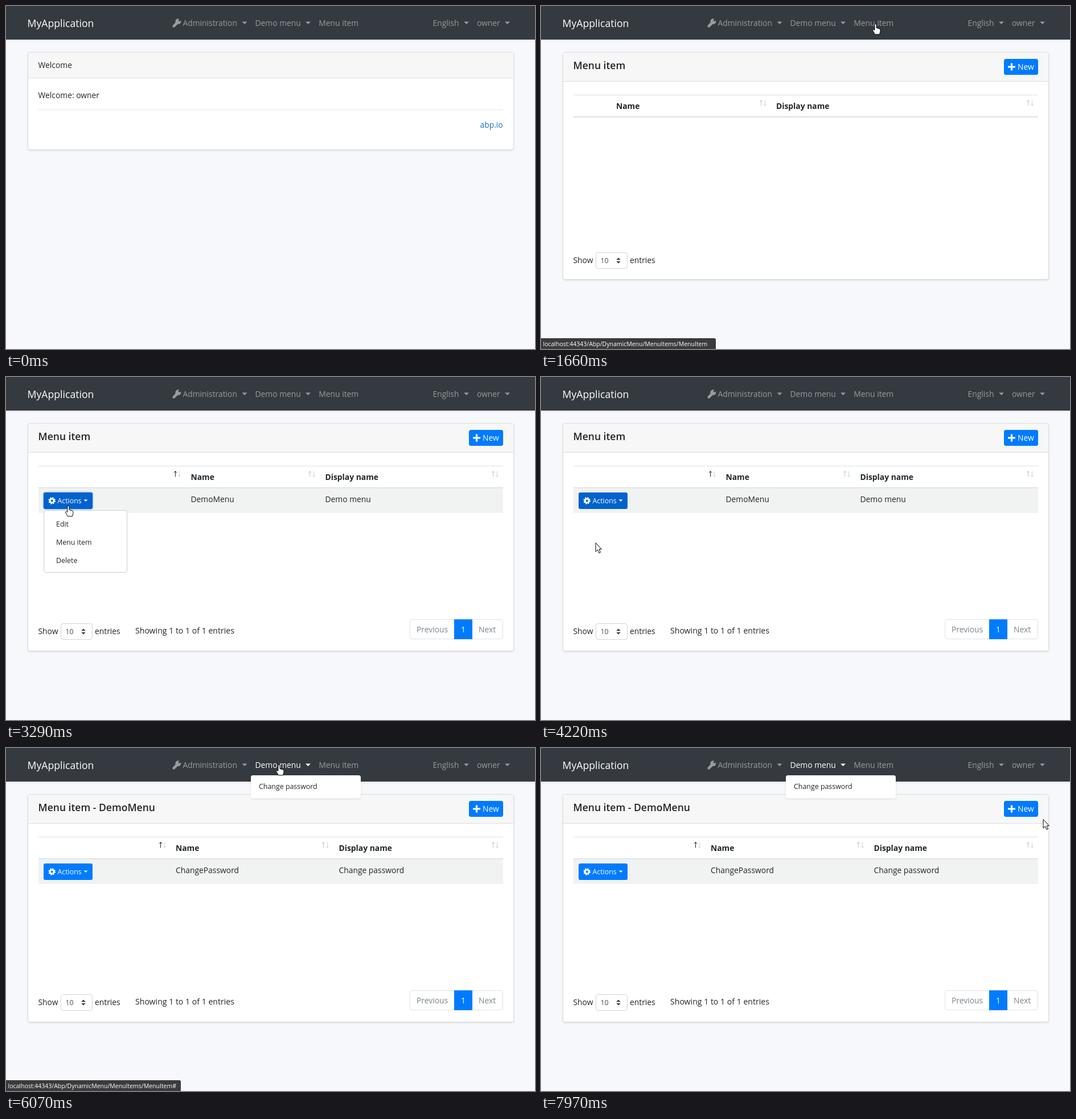
Animation, 929 px wide and 603 px high, one loop 8000 ms. Source, as an HTML page:

```html
<!DOCTYPE html>
<html lang="en">
<head>
<meta charset="utf-8">
<title>Menu items</title>
<style>
html, body { margin: 0; width: 100%; height: 100%; overflow: hidden; background: #f7f8fb; }
svg { display: block; font-family: "Open Sans", "Noto Sans", sans-serif; font-size: 13.85px; }
text { white-space: pre; }
.brand { font-size: 17.65px; }
.title { font-size: 17.55px; font-weight: 600; }
.bold { font-weight: 700; }
.wide { font-size: 14.1px; }
.small { font-size: 12.4px; }
.tiny { font-size: 10.5px; }
</style>
</head>
<body>
<svg width="929" height="603" viewBox="0 0 929 603">
  <defs>
    <filter id="soft" x="-5%" y="-10%" width="110%" height="125%" color-interpolation-filters="sRGB">
      <feDropShadow dx="0" dy="1.5" stdDeviation="1.8" flood-opacity=".1"/>
    </filter>
  </defs>
  <g id="page"></g>
  <g id="status"></g>
  <path id="cursor" stroke="#000" stroke-linejoin="round"/>
</svg>
<script>
const LOOP = 8000, STEP = 64;
const USER = 'owner';
const BLUE = '#007bff', INK = '#212529', LINK = '#999c9f', LIT = '#ccced0';
const LINE = '#dee2e6', DARK = '#343a40', GRAY = '#7b838a';
const LEFT = 57, RIGHT = 873, WIDTH = RIGHT - LEFT;

// Moments at which the page reacts
const AT = {
  hover: 780, list: 1510, rows: 1880, press: 3100, drop: 3160, pick: 4130,
  sub: 4400, subRows: 4680, demoHover: 5540, demoOpen: 5860
};
const during = (t, a, b = LOOP) => t >= a && t < b;

// Drawing helpers
const $ = id => document.getElementById(id);
const text = (x, y, s, fill = INK, cls = '') =>
  `<text x="${x}" y="${y}" fill="${fill}" class="${cls}">${s}</text>`;
const rect = (x, y, w, h, fill, extra = '') =>
  `<rect x="${x}" y="${y}" width="${w}" height="${h}" fill="${fill}" ${extra}/>`;
const box = (x, y, w, h, fill, stroke, extra = '') =>
  rect(x + .5, y + .5, w - 1, h - 1, fill, `rx="3.5" stroke="${stroke}" ${extra}`);
const path = (d, fill, extra = '') => `<path d="${d}" fill="${fill}" ${extra}/>`;
const stroke = (d, color, width = 1) => path(d, 'none', `stroke="${color}" stroke-width="${width}"`);
const dot = (x, y, r, fill, extra = '') => `<circle cx="${x}" cy="${y}" r="${r}" fill="${fill}" ${extra}/>`;
const rule = (y, color = LINE, h = 1) => rect(LEFT, y, WIDTH, h, color);
const caret = (x, y, fill, r = 4.4) => path(`M${x - r} ${y}h${2 * r}l${-r} ${r}z`, fill);

// Pointer: start, end and place reached; it leaves from the place before
const ENTRY = [861, 507];
const MOVES = [
  [140, 840, 579, 24], [1310, 1310, 588, 19],
  [1450, 1660, 587, 31], [1720, 2250, 519, 289],
  [2310, 2450, 199, 273], [2510, 2870, 112, 214],
  [3100, 3810, 95, 291], [4360, 5160, 316, 214],
  [5210, 6010, 479, 28], [6070, 6850, 479, 71],
  [6910, 6990, 525, 72], [7130, 7400, 390, 262], [7460, 7970, 881, 125]
];

function pointer(t) {
  const i = MOVES.filter(m => t >= m[0]).length - 1;
  if (i < 0) return null;
  const [start, end, ...to] = MOVES[i];
  const from = i ? MOVES[i - 1].slice(2) : ENTRY;
  const n = Math.round((end - start) / STEP);
  const u = t >= end ? 1 : (Math.floor((t - start) / (end - start) * n) + 1) / (n + 1);
  const ease = u * u * (3 - 2 * u);
  return to.map((v, k) => Math.round(from[k] + (v - from[k]) * ease));
}

const SHAPES = {
  arrow: 'M.5 0V15.6L4 12.3L6.4 17.9L8.9 16.8L6.5 11.3H10.8Z',
  hand: 'M-1.6 11V1Q0-1 1.6 1V7L7 8.4Q8.6 9 8.5 13L7 18.4H-1L-5 11.6Q-5-9.6-1.6 11Z'.replace('-5-9.6', '-4.6 8.6'),
  ibeam: 'M-3-7.5H3M0-7.5V7.5M-3 7.5H3'
};

const inside = (p, x, y, w, h) => !!p && p[0] >= x && p[0] < x + w && p[1] >= y && p[1] < y + h;

function stateAt(t) {
  const p = pointer(t);
  const s = {
    view: t < AT.list ? 'home' : t < AT.sub ? 'root' : 'sub',
    ready: during(t, AT.rows, AT.sub) || t >= AT.subRows,
    itemHover: during(t, AT.hover, AT.list),
    actions: during(t, AT.drop, AT.pick),
    ring: during(t, AT.press, AT.pick),
    demo: t >= AT.demoOpen ? 2 : t >= AT.demoHover ? 1 : 0
  };
  const onButton = s.ready && inside(p, 66, 203, 86, 29);
  s.button = during(t, AT.press, AT.sub) ? '#0062cc' : onButton ? '#0069d9' : BLUE;
  s.row = s.actions && p[1] >= 242 ? Math.floor((p[1] - 242) / 32) : -1;
  s.sub = s.demo === 2 && inside(p, 430, 48, 193, 42);
  const onNav = inside(p, 430, 14, 192, 34);
  const kind = onNav || onButton || s.row >= 0 || s.sub ? 'hand'
    : s.view === 'sub' && s.ready && inside(p, 298, 206, 110, 18) ? 'ibeam' : 'arrow';
  return { s, p, kind };
}

function wrench() {
  return path('M294.7 35.3L301 29', 'none', `stroke="${LINK}" stroke-width="4.6" stroke-linecap="round"`) +
    dot(302.3, 27.2, 4.9, LINK) + stroke('M303.5 26L309 20.5', DARK, 3.6);
}

function nav(s) {
  const link = (x, label, arrow, color = LINK) =>
    text(x, 35, label, color) + (arrow ? caret(arrow, 27.5, color) : '');
  return rect(0, 0, 929, 59, DARK, 'filter="url(#soft)"') + wrench() +
    text(37.5, 37, 'MyApplication', '#fff', 'brand') +
    link(310.5, 'Administration', 419) +
    link(437.5, 'Demo menu', 530.5, [LINK, LIT, '#fff'][s.demo]) +
    link(549.3, 'Menu item', 0, s.itemHover ? LIT : LINK) +
    link(749.5, 'English', 808.5) + link(827, USER, 880.5);
}

function card(bottom, headEnd) {
  return box(38, 81, 854, bottom - 81, '#fff', '#dcdcde', 'filter="url(#soft)"') +
    rect(39, 82, 852, headEnd - 82, '#f7f7f7', 'rx="3"') + rect(38, headEnd, 854, 1, '#dcdcdd');
}

function home() {
  return card(253, 126) + text(56.5, 109, 'Welcome') +
    text(56.5, 162, `Welcome: ${USER}`) + rule(182, '#e5e5e5') +
    text(832.5, 214, 'abp.io', '#0f74bd');
}

function sorter(x, active) {
  const arrow = (px, y, dir, color) => stroke(`M${px} 165.5v10M${px - 2.5} ${y + 3 * dir}l2.5 ${-3 * dir}l2.5 ${3 * dir}`, color);
  return arrow(x, 165.5, 1, active ? INK : '#c3c7ca') + arrow(x + 7, 175.5, -1, '#bfdce2');
}

function actionButton(s) {
  const [x, y] = [80.7, 217.5];
  return (s.ring ? rect(64.5, 201.5, 89, 32, '#a9cffb', 'rx="5"') : '') +
    rect(66, 203, 86, 29, s.button, 'rx="3"') +
    dot(x, y, 3.4, 'none', 'stroke="#fff" stroke-width="2.8"') +
    dot(x, y, 5.2, 'none', 'stroke="#fff" stroke-width="2.2" stroke-dasharray="2.2 1.884"') +
    text(90.5, 222, 'Actions', '#fff', 'small') + caret(140, 215.6, '#fff', 3.5);
}

function actionMenu(s) {
  const rows = ['Edit', 'Menu item', 'Delete'].map((label, i) => {
    const y = 242 + 32 * i;
    return (i === s.row ? rect(67, y, 145, 32, '#e9ecef') : '') + text(88, y + 20.5, label, INK, 'small');
  });
  return box(66, 234, 147, 110, '#fff', '#cfcfcf') + rows.join('');
}

function pager() {
  return text(227, 450.5, 'Showing 1 to 1 of 1 entries', INK, 'wide') +
    box(709, 426, 164, 35, '#fff', LINE) + rect(787, 426, 32, 35, BLUE) +
    text(721, 449, 'Previous', GRAY) + text(799, 449, '1', '#fff') + text(830, 449, 'Next', GRAY);
}

function newButton() {
  return rect(813, 93, 60, 28, BLUE, 'rx="3.5"') +
    stroke('M820 107h13M826.5 100.5v13', '#fff', 3.2) + text(837, 112, 'New', '#fff');
}

function pageSize() {
  return text(56.5, 451.5, 'Show') + text(156, 451.5, 'entries') +
    box(96, 433, 56, 29, '#fff', '#ced4da') + text(104.5, 452, '10', '#495057', 'small') +
    caret(136, 448.7, DARK, 3.8) + `<g transform="matrix(1 0 0 -1 0 895)">${caret(136, 448.7, DARK, 3.8)}</g>`;
}

function list(s) {
  const sub = s.view === 'sub';
  const columns = !s.ready ? [132, 413] : sub ? [298, 584.5] : [324.5, 560.5];
  const row = sub ? ['ChangePassword', 'Change password'] : ['DemoMenu', 'Demo menu'];
  const cells = (y, labels, cls) => labels.map((s, i) => text(columns[i], y, s, INK, cls)).join('');
  // Each sort mark sits just before the next column
  const marks = [columns[1], RIGHT + 9].map(x => sorter(Math.floor(x) - 26.5)).join('');
  const frame = card(s.ready ? 482 : 481, 132) +
    text(56.5, 111, sub ? 'Menu item - DemoMenu' : 'Menu item', INK, 'title') + newButton() +
    rule(156) + rule(194, '#d9dcdf', 1.7) + marks +
    cells(181, ['Name', 'Display name'], 'bold') + pageSize();
  if (!s.ready) return frame;
  return frame + sorter(Math.floor(columns[0]) - 26.5, true) + rule(195.5, '#f1f2f2', 43.5) +
    cells(220, row) + actionButton(s) + pager() + (s.actions ? actionMenu(s) : '');
}

function demoMenu(s) {
  return rect(430, 48, 193, s.sub ? 42 : 40.5, s.sub ? '#e9ecef' : '#fff', 'rx="3.5" filter="url(#soft)"') +
    text(444, 72, 'Change password', INK, 'small');
}

// Status bubble, fading in and out
const LIST_URL = 'localhost:44343/Abp/DynamicMenu/MenuItems/MenuItem';
const HINTS = [
  { from: 1030, to: 1990, width: 307, label: LIST_URL },
  { from: 5740, to: 6480, width: 307, label: LIST_URL + '#' },
  { from: 6480, to: 7480, width: 210, label: 'https://localhost:44343/Account/Manage' }
];

function hint(t) {
  const h = HINTS.find(h => during(t, h.from, h.to));
  if (!h) return '';
  const alpha = Math.min(1, (t - h.from + 40) / 120, (h.to - t) / 100);
  return `<g opacity="${alpha.toFixed(2)}">` + rect(-4, 584, h.width + 4, 24, '#3b3b3d', 'rx="3"') +
    text(3.5, 597.5, h.label, '#fff', 'tiny') + '</g>';
}

let lastPage = '';

function draw(t) {
  const { s, p, kind } = stateAt(t);
  const key = JSON.stringify(s);
  if (key !== lastPage) {
    lastPage = key;
    $('page').innerHTML = (s.view === 'home' ? home() : list(s)) + nav(s) + (s.demo === 2 ? demoMenu(s) : '');
  }
  $('status').innerHTML = hint(t);
  const cursor = $('cursor');
  cursor.style.display = p ? '' : 'none';
  if (!p) return;
  cursor.setAttribute('d', SHAPES[kind]);
  cursor.setAttribute('fill', kind === 'ibeam' ? 'none' : '#fff');
  cursor.setAttribute('transform', `translate(${p[0] + .5} ${p[1] + .5})`);
}

const begin = performance.now();
function tick() {
  draw((performance.now() - begin) % LOOP);
  requestAnimationFrame(tick);
}
tick();
</script>
</body>
</html>
```
